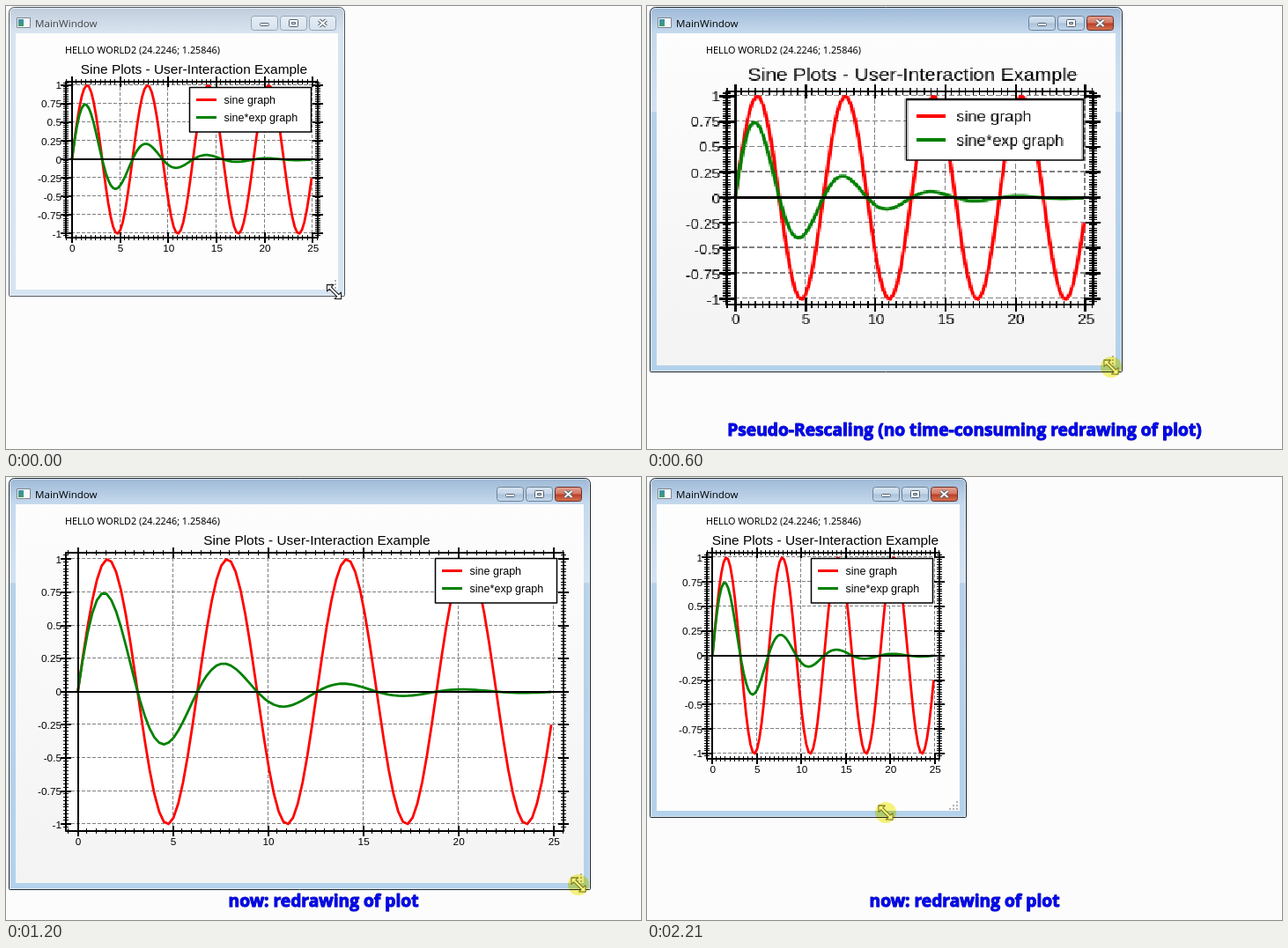
These frames come from a looping animation (721 by 503 pixels, 2.61 s). An HTML page with a canvas:

```html
<!DOCTYPE html>
<html lang="en">
<head>
<meta charset="utf-8">
<title>Plot window resizing</title>
<style>
  html, body { margin: 0; width: 100%; height: 100%; overflow: hidden; background: #fcfcfc; }
  canvas { display: block; }
</style>
</head>
<body>
<canvas id="stage" width="721" height="503"></canvas>
<script>
const stage = document.getElementById('stage');
const ctx = stage.getContext('2d');
const LOOP = 2610;
const SANS = '"Liberation Sans", Arial, sans-serif';
const UI = '"Open Sans", "Noto Sans", sans-serif';
const RESCALE = 'Pseudo-Rescaling (no time-consuming redrawing of plot)';
const REDRAW = 'now: redrawing of plot';

// The plot widget sits at a fixed origin and grows with the window.
const PLOT = { x: 19, y: 56 };
const plotSize = ([w, h]) => [w - 44, h - 96];

// Window sizes at which the plot is really redrawn.
const SMALL = [385, 330], LARGE = [664, 469], FINAL = [363, 387];

const states = [
  { at: 0,    win: SMALL,      drawn: SMALL, cursor: [372.5, 324.5], caption: '' },
  { at: 200,  win: [387, 332], drawn: SMALL, cursor: [374, 326], caption: RESCALE },
  { at: 400,  win: [399, 340], drawn: SMALL, cursor: [386, 334], caption: RESCALE },
  { at: 600,  win: [540, 416], drawn: SMALL, cursor: [527, 410], caption: RESCALE },
  { at: 800,  win: [619, 471], drawn: SMALL, cursor: [606, 466], caption: RESCALE },
  { at: 1000, win: [660, 469], drawn: SMALL, cursor: [647, 463], caption: RESCALE },
  { at: 1200, win: LARGE,      drawn: LARGE, cursor: [650, 463], caption: REDRAW },
  { at: 1610, win: [599, 463], drawn: LARGE, cursor: [577, 456], caption: RESCALE },
  { at: 1810, win: [378, 399], drawn: LARGE, cursor: [365, 393], caption: RESCALE },
  { at: 2010, win: FINAL,      drawn: LARGE, cursor: [350, 381], caption: RESCALE },
  { at: 2210, win: FINAL,      drawn: FINAL, cursor: [271, 381], caption: REDRAW }
];

function text(c, string, x, y, font, align = 'left', color = '#000') {
  c.font = font;
  c.textAlign = align;
  c.textBaseline = 'alphabetic';
  c.fillStyle = color;
  c.fillText(string, x, y);
}

function line(c, x1, y1, x2, y2, color, width) {
  c.strokeStyle = color;
  c.lineWidth = width;
  c.beginPath();
  c.moveTo(x1, y1);
  c.lineTo(x2, y2);
  c.stroke();
}

function box(c, x, y, w, h, radius, fill, stroke) {
  c.beginPath();
  c.roundRect(x + .5, y + .5, w - 1, h - 1, radius);
  c.fillStyle = fill;
  c.fill();
  c.lineWidth = 1;
  c.strokeStyle = stroke;
  c.stroke();
}

function gradient(y1, y2, ...stops) {
  const g = ctx.createLinearGradient(0, y1, 0, y2);
  for (const [offset, color] of stops) g.addColorStop(offset, color);
  return g;
}

function renderPlot(size) {
  const canvas = document.createElement('canvas');
  [canvas.width, canvas.height] = plotSize(size);
  const c = canvas.getContext('2d');
  c.translate(-PLOT.x, -PLOT.y);

  const left = 68, top = 86, right = size[0] - 31, bottom = size[1] - 67;
  const width = right - left, height = bottom - top;
  const px = x => left + width * (.024 + .956 * x / 25);
  const py = y => top + (height - .5) * (.5 - .477 * y);
  const snap = Math.round;

  c.fillStyle = '#fff';
  c.fillRect(left, top, width, height);

  c.setLineDash([4, 2]);
  for (let x = 5; x <= 25; x += 5) {
    const gx = snap(px(x)) - .5;
    line(c, gx, top, gx, bottom, '#808080', 1);
  }
  for (let y = -1; y <= 1; y += .25) {
    const gy = snap(py(y)) - .5;
    line(c, left, gy, right, gy, '#808080', 1);
  }
  c.setLineDash([]);

  const curve = (f, color) => {
    c.beginPath();
    for (let i = 0; i < 100; i++) {
      const x = i / 100 * 8 * Math.PI;
      c.lineTo(px(x), py(f(x)));
    }
    c.strokeStyle = color;
    c.lineWidth = 2.8;
    c.lineJoin = 'round';
    c.stroke();
  };
  curve(Math.sin, '#f00');
  curve(x => Math.sin(x) * Math.exp(-.2 * x), '#008000');

  c.strokeStyle = '#000';
  c.lineWidth = 2;
  c.strokeRect(left, top, width, height);
  line(c, snap(px(0)), top, snap(px(0)), bottom, '#000', 2);
  line(c, left, snap(py(0)), right, snap(py(0)), '#000', 2);

  c.fillStyle = '#000';
  const tick = i => i % 10 ? [3, 1] : [6, 2];
  for (let i = -1; i <= 51; i++) {
    const [reach, weight] = tick(i);
    for (const y of [top, bottom]) c.fillRect(snap(px(i / 2)) - 1, y - reach, weight, 2 * reach);
  }
  for (let i = -41; i <= 41; i++) {
    const [reach, weight] = tick(i);
    for (const x of [left, right]) c.fillRect(x - reach, snap(py(i / 40)) - 1, 2 * reach, weight);
  }

  const labelFont = '11.8px ' + SANS;
  for (let x = 0; x <= 25; x += 5) text(c, x, px(x) + .5, bottom + 16, labelFont, 'center');
  for (let y = -1; y <= 1; y += .25) text(c, y, 63, py(y) + 4.3, labelFont, 'right');
  text(c, 'Sine Plots - User-Interaction Example', (left + right) / 2 + 2.4, 77, '15.45px ' + SANS, 'center');

  const lx = right - 145.5;
  c.fillStyle = '#fff';
  c.fillRect(lx, 92.5, 138, 50.5);
  c.strokeStyle = '#000';
  c.lineWidth = 1.5;
  c.strokeRect(lx, 92.5, 138, 50.5);
  [['sine graph', '#f00', 106.5], ['sine*exp graph', '#008000', 126.5]].forEach(([name, color, y]) => {
    line(c, lx + 7.5, y, lx + 30.5, y, color, 3);
    text(c, name, lx + 39, y + 4.5, '12.55px ' + SANS);
  });
  return canvas;
}

const plots = new Map([SMALL, LARGE, FINAL].map(size => [size, renderPlot(size)]));

function drawButtons(right, active) {
  const glass = active
    ? gradient(11, 28, [0, '#d8e5f2'], [.48, '#c3d5e8'], [.52, '#a9c1da'], [1, '#c6dbee'])
    : gradient(11, 28, [0, '#e6eef6'], [1, '#d6e2ee']);
  const red = gradient(11, 28, [0, '#e5a595'], [.48, '#d27763'], [.52, '#bb3d25'], [1, '#d47a58']);
  const edge = active ? '#6f8297' : '#95a4b4';
  const ink = '#535f6d';
  box(ctx, right - 107, 11, 31, 17, 3, glass, edge);
  box(ctx, right - 74, 11, 31, 17, 3, glass, edge);
  box(ctx, right - 41, 11, 31, 17, 3, active ? red : glass, active ? '#6d302a' : edge);

  box(ctx, right - 97, 19, 11, 4, 1, '#fff', ink);
  box(ctx, right - 64, 15, 11, 9, 1, '#fff', ink);
  box(ctx, right - 61, 18, 5, 3, 0, glass, ink);
  const x = right - 25.5;
  for (const [color, width] of [[ink, 4], ['#fff', 2]]) {
    line(ctx, x - 4, 16, x + 4, 23, color, width);
    line(ctx, x + 4, 16, x - 4, 23, color, width);
  }
}

function drawWindow([right, bottom], active) {
  const skin = active
    ? gradient(1, bottom, [0, '#9db8d6'], [29 / bottom, '#c5d9ed'], [119 / bottom, '#d3e3f3'],
        [120 / bottom, '#b7d1ea'], [1, '#b4d2ec'])
    : gradient(1, bottom, [0, '#bfccda'], [29 / bottom, '#d9e4f0'], [1, '#d7e4f2']);
  box(ctx, 3, 1, right - 3, bottom - 1, [6, 6, 1, 1], skin, active ? '#20262c' : '#4c555e');
  ctx.strokeStyle = 'rgba(255,255,255,.55)';
  ctx.beginPath();
  ctx.roundRect(4.5, 2.5, right - 6, bottom - 4, [5, 5, 0, 0]);
  ctx.stroke();

  const shade = right > 500 ? '#f3f3f3' : '#fdfdfd';
  ctx.fillStyle = gradient(30, bottom, [0, '#fdfdfd'], [1, shade]);
  ctx.fillRect(11, 31, right - 19, bottom - 39);

  box(ctx, 12, 13, 16, 12, 0, '#f8fafb', '#7d8790');
  ctx.fillStyle = gradient(15, 23, [0, '#3b8fb5'], [1, '#3f9a68']);
  ctx.fillRect(14, 15, 6, 8);
  text(ctx, 'MainWindow', 33, 24, '11.6px ' + UI, 'left', active ? '#000' : '#444');
  drawButtons(right, active);

  ctx.fillStyle = '#b4b4b4';
  for (let row = 0; row < 3; row++)
    for (let col = 0; col <= row; col++)
      ctx.fillRect(right - 12 - 4 * col, bottom - 19 + 4 * row, 2, 2);
}

function drawCursor([x, y], halo) {
  ctx.save();
  ctx.translate(x, y);
  ctx.save();
  ctx.rotate(Math.PI / 4);
  ctx.beginPath();
  for (const s of [1, -1])
    for (const [ax, ay] of [[-6, -1.5], [6, -1.5], [6, -5.2], [11.5, 0], [6, 5.2], [6, 1.5]])
      ctx.lineTo(s * ax, s * ay);
  ctx.closePath();
  ctx.fillStyle = '#fff';
  ctx.fill();
  ctx.strokeStyle = halo ? '#80804a' : '#222';
  ctx.lineWidth = 1.1;
  ctx.stroke();
  ctx.restore();
  if (halo) {
    ctx.globalCompositeOperation = 'multiply';
    ctx.fillStyle = '#f7f47c';
    ctx.beginPath();
    ctx.arc(0, 0, 12, 0, 2 * Math.PI);
    ctx.fill();
  }
  ctx.restore();
}

function drawCaption(caption) {
  ctx.font = 'bold 19.2px ' + UI;
  ctx.textAlign = 'center';
  ctx.lineJoin = 'round';
  ctx.lineWidth = 1;
  ctx.strokeStyle = '#0000a8';
  ctx.strokeText(caption, 360.5, 488);
  text(ctx, caption, 360.5, 488, ctx.font, 'center', '#0008ee');
}

function draw(time) {
  const state = states.findLast(s => s.at <= time);
  const active = state.at > 0;
  ctx.fillStyle = '#fcfcfc';
  ctx.fillRect(0, 0, stage.width, stage.height);
  drawWindow(state.win, active);

  // Stretch the cached bitmap without smoothing, as a quick preview does.
  const [w, h] = plotSize(state.win);
  ctx.imageSmoothingEnabled = false;
  ctx.drawImage(plots.get(state.drawn), PLOT.x, PLOT.y, w, h);

  text(ctx, 'HELLO WORLD2 (24.2246; 1.25846)', 67, 54, '10.8px "Noto Sans", sans-serif');
  drawCaption(state.caption);
  drawCursor(state.cursor, active);
}

const start = performance.now();
function tick() {
  draw((performance.now() - start) % LOOP);
  requestAnimationFrame(tick);
}
tick();
</script>
</body>
</html>
```
